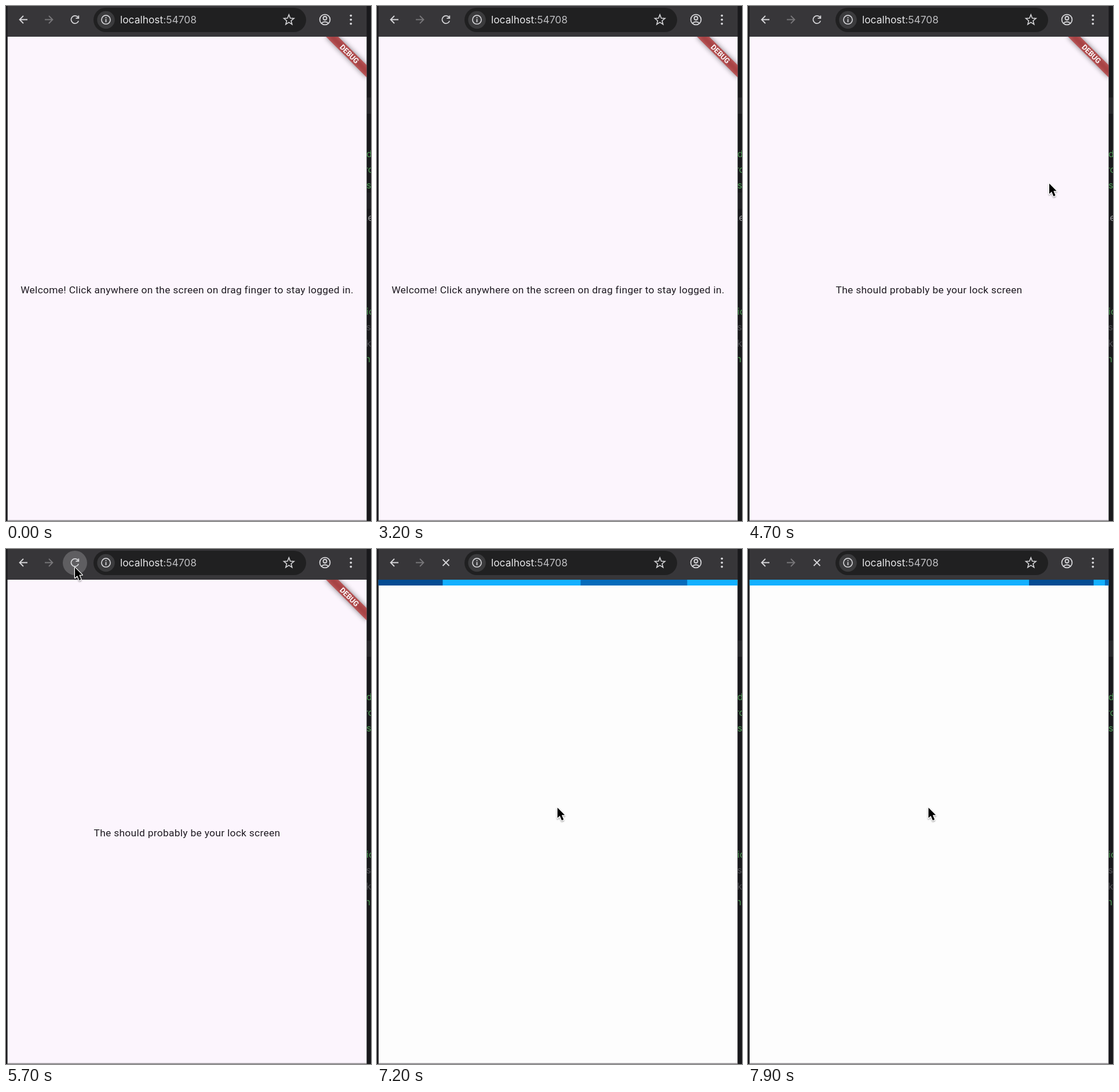
Recreate the animation shown at these times as an HTML page. Size 630 by 889 pixels, loop 8000 ms.

```html
<!DOCTYPE html>
<html lang="en">
<head>
<meta charset="utf-8">
<title>Lock screen demo</title>
<style>
html, body { margin: 0; width: 100%; height: 100%; overflow: hidden; background: #19191c; }
svg { display: block; width: 100%; height: 100%; }
.body { font: 17.36px Roboto, sans-serif; letter-spacing: .31px; fill: #1f1b22; text-anchor: middle; }
.url { font: 17.36px Inter, sans-serif; fill: #e6e6e8; }
.code { font: 16px Inter, sans-serif; fill: #4b9752; }
.icon { fill: none; stroke: #d6d6d9; stroke-width: 1.8; }
</style>
</head>
<body>
<svg viewBox="0 0 630 889">
  <defs>
    <clipPath id="view"><rect x="2.5" y="53" width="620" height="835"/></clipPath>
    <clipPath id="side"><rect x="623" y="0" width="7" height="889"/></clipPath>
    <filter id="soft" x="-50%" y="-150%" width="200%" height="400%"><feGaussianBlur stdDeviation="4.9"/></filter>
    <filter id="drop" x="-60%" y="-40%" width="220%" height="200%">
      <feDropShadow dx="0" dy="1.5" stdDeviation="1.3" flood-opacity=".4"/>
    </filter>
  </defs>

  <!-- editor behind the window -->
  <rect width="630" height="889" fill="#19191c"/>
  <g clip-path="url(#side)" class="code">
    <rect x="623" y="158" width="7" height="28" fill="#27272a"/>
    <rect id="row" x="623" y="322" width="7" height="28" fill="#202023"/>
    <text x="622" y="261">d</text>
    <text x="619" y="288">rc</text>
    <text x="622" y="315">s</text>
    <text id="note" x="620" y="371" fill="#9a9a9d">.e</text>
    <text x="622" y="533">ic</text>
    <text x="621.5" y="560" fill="#4c4c50">s</text>
    <text x="621.5" y="588" fill="#4c4c50">k</text>
    <text x="619.5" y="615">nl</text>
  </g>

  <!-- toolbar -->
  <rect x="2.5" width="620" height="53" fill="#373639"/>
  <rect x="151" y="3" width="367" height="42" rx="21" fill="#202021"/>
  <circle cx="172.5" cy="24" r="15.2" fill="#3b3b3d"/>
  <circle id="hover" cx="119" cy="24" r="21" fill="#fff"/>
  <g class="icon">
    <path d="M37 23.5H24M30 17L23.5 23.5L30 30"/>
    <path d="M67 23.5H80M74 17L80.5 23.5L74 30" stroke="#777679"/>
    <g id="reload">
      <path d="M124.6 20A6.6 6.6 0 1 0 125.2 25.8"/>
      <path d="M125.3 16.4V21.2H120.4"/>
    </g>
    <path id="stop" d="M113.5 18L124.5 29M124.5 18L113.5 29"/>
    <circle cx="172.5" cy="23.7" r="7.6" stroke-width="1.6"/>
    <path d="M172.5 22.6V28M172.5 19.2V21"/>
    <path id="star" stroke-width="1.6"/>
    <circle cx="550.5" cy="23.5" r="8.9"/>
    <circle cx="550.5" cy="21" r="3"/>
    <path d="M544.4 29.8Q550.5 24.8 556.6 29.8"/>
  </g>
  <g fill="#d6d6d9">
    <circle cx="595.3" cy="16.6" r="1.9"/>
    <circle cx="595.3" cy="23.6" r="1.9"/>
    <circle cx="595.3" cy="30.6" r="1.9"/>
  </g>
  <text class="url" x="197" y="30">localhost<tspan fill="#bebec1">:54708</tspan></text>

  <g clip-path="url(#view)">
    <g id="app">
      <rect x="2.5" y="53" width="620" height="835" fill="#fcf5fd"/>
      <text id="welcome" class="body" x="312.5" y="495.5">Welcome! Click anywhere on the screen on drag finger to stay logged in.</text>
      <g id="lock">
        <rect x="2.5" y="53" width="620" height="835" fill="#fcf5fd"/>
        <text class="body" x="312.5" y="495.5">The should probably be your lock screen</text>
      </g>
      <g transform="translate(622.5 53) rotate(45)">
        <rect x="-49.6" y="34.7" width="99.2" height="14.9" opacity=".5" filter="url(#soft)"/>
        <rect x="-49.6" y="34.7" width="99.2" height="14.9" fill="#b71c1c" fill-opacity=".627"/>
        <text y="46.6" text-anchor="middle" font-family="Roboto, sans-serif" font-weight="700" font-size="12.65" fill="#fff">DEBUG</text>
      </g>
    </g>
    <g id="loader">
      <rect x="2.5" y="53" width="620" height="835" fill="#fdfdfd"/>
      <rect x="2.5" y="53" width="620" height="10" fill="#13b0ff"/>
      <rect id="first" y="53" height="10" fill="#056bbb"/>
      <rect id="second" y="53" height="10" fill="#044c93"/>
    </g>
  </g>
  <rect x="2.5" y="887.5" width="620" height="1.5" fill="#8c898d"/>
  <path id="pointer" filter="url(#drop)" d="M0 0V17.8L4.1 14L7.4 21.9L10.6 20.6L7.3 12.8H12.6Z"
    stroke="#fff" stroke-width="2.4" stroke-linejoin="round" paint-order="stroke"/>
</svg>
<script>
const LOOP = 8000, STEP = 100, LEFT = 2.5, WIDTH = 620;
const el = id => document.getElementById(id);
const set = (id, attrs) => Object.entries(attrs).forEach(([k, v]) => el(id).setAttribute(k, v));
const show = (id, on) => set(id, { visibility: on ? 'visible' : 'hidden' });
const clamp = v => Math.min(1, Math.max(0, v));

function bezier(x1, y1, x2, y2) {
  const at = (a, b, s) => 3 * a * s * (1 - s) ** 2 + 3 * b * s * s * (1 - s) + s ** 3;
  return x => {
    if (x <= 0 || x >= 1) return clamp(x);
    let lo = 0, hi = 1;
    for (let i = 0; i < 30; i++) {
      const mid = (lo + hi) / 2;
      if (at(x1, x2, mid) < x) lo = mid; else hi = mid;
    }
    return at(y1, y2, lo);
  };
}

const easeOut = bezier(0, 0, .58, 1);
const easeIn = bezier(.42, 0, 1, 1);
const pageOut = bezier(.35, .91, .33, .97);

// two cubic pieces joined at (mx, my)
const mx = .198, my = .541;
const pageInA = bezier(.056 / mx, .024 / my, .108 / mx, .3085 / my);
const pageInB = bezier((.3655 - mx) / (1 - mx), 1, (.5465 - mx) / (1 - mx), (.989 - my) / (1 - my));
const pageIn = t => t < mx ? my * pageInA(t / mx) : my + (1 - my) * pageInB((t - mx) / (1 - mx));

// rows of [time, ...values], joined by straight lines
function track(rows, t) {
  const i = rows.findIndex(r => r[0] > t);
  if (i === 0) return rows[0].slice(1);
  if (i < 0) return rows[rows.length - 1].slice(1);
  const a = rows[i - 1], b = rows[i], p = (t - a[0]) / (b[0] - a[0]);
  return a.slice(1).map((v, k) => v + (b[k + 1] - v) * p);
}

const POINTER = [
  [4700, 520, 306.5], [4800, 370, 218], [4900, 236, 149], [5000, 236, 149],
  [5200, 164, 74], [5400, 119, 32], [6200, 119, 32],
  [6300, 150, 110], [6400, 252, 330], [6500, 311.5, 446.5]
];
const HOVER = [
  [5200, 0], [5500, .2], [5900, .2], [6000, .06], [6400, .05], [6500, .04], [6800, 0]
];

function segment(id, from, p) {
  set(id, { x: LEFT + WIDTH * (from + (1 - from) * p), width: WIDTH * (1 - .9 * p) });
}

function draw(ms) {
  const t = Math.floor(ms / STEP) * STEP;
  const swap = clamp((t - 3200) / 500);
  set('welcome', { transform: `translate(${-WIDTH / 3 * pageOut(swap)} 0)` });
  set('lock', { transform: `translate(${WIDTH * (1 - pageIn(swap))} 0)` });

  show('row', t < 4200);
  show('note', t < 4800);
  show('reload', t < 6000);
  show('stop', t >= 6000);
  show('app', t < 6300);
  show('loader', t >= 6300);

  const cycle = Math.max(0, t - 6008) % 2000 / 2000;
  segment('first', -1, easeOut(cycle));
  segment('second', -1.5, easeIn(cycle));

  show('pointer', t >= 4700);
  set('pointer', { transform: `translate(${track(POINTER, t).join(' ')})` });
  set('hover', { opacity: track(HOVER, t)[0] });
}

const corners = Array.from({ length: 10 }, (_, i) => {
  const r = i % 2 ? 4 : 9.2, a = i * Math.PI / 5;
  return [488.3 + r * Math.sin(a), 24.2 - r * Math.cos(a)].join(' ');
});
set('star', { d: 'M' + corners.join('L') + 'Z' });

const start = performance.now();
function tick() {
  draw((performance.now() - start) % LOOP);
  requestAnimationFrame(tick);
}
tick();
</script>
</body>
</html>
```
